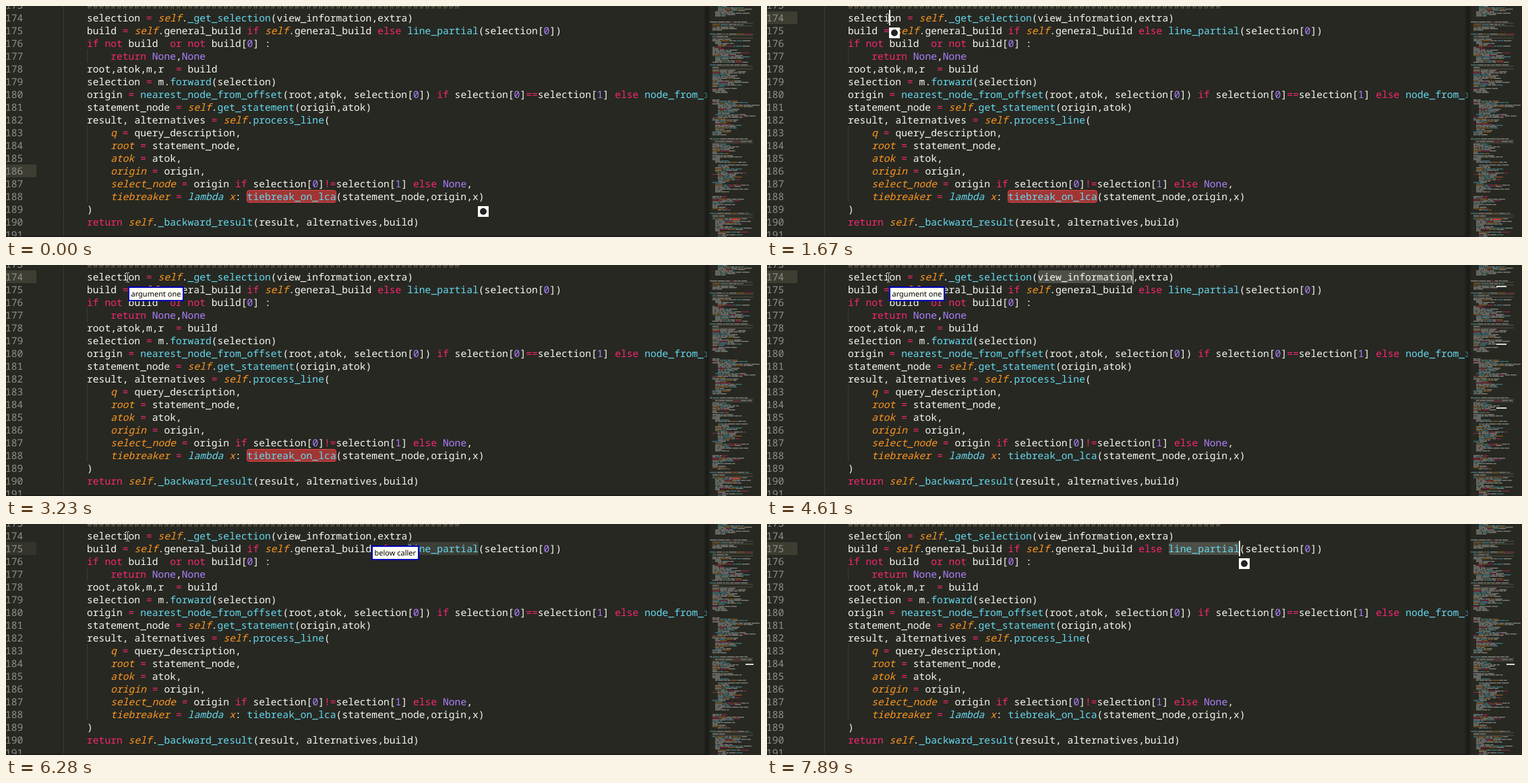
An HTML page with a canvas for the animation above (7.99 s loop, 1120 by 344 pixels).

```html
<!DOCTYPE html>
<html lang="en">
<head>
<meta charset="utf-8">
<title>Voice driven code selection</title>
<style>
html, body { margin: 0; width: 100%; height: 100%; overflow: hidden; background: #272822; }
canvas { display: block; }
</style>
</head>
<body>
<canvas id="stage" width="1120" height="344"></canvas>
<script>
const ctx = document.getElementById('stage').getContext('2d');
const LOOP = 7990, CHAR = 8.8, ROW = 19, LEFT = 120, FIRST = 173;
const MONO = '500 14.667px "Noto Sans Mono", "DejaVu Sans Mono", monospace';
const WHITE = '#f8f8f2', PINK = '#f92672', CYAN = '#66d9ef', PURPLE = '#ae81ff',
      ORANGE = '#fd971f', COMMENT = '#75715e', LIT = '#3e3d32', SELECTED = '#4e4f47';

const code = `${'#'.repeat(63)}
selection = self._get_selection(view_information,extra)
build = self.general_build if self.general_build else line_partial(selection[0])
if not build  or not build[0] :
    return None,None
root,atok,m,r  = build
selection = m.forward(selection)
origin = nearest_node_from_offset(root,atok, selection[0]) if selection[0]==selection[1] else node_from_range(
statement_node = self.get_statement(origin,atok)
result, alternatives = self.process_line(
    q = query_description,
    root = statement_node,
    atok = atok,
    origin = origin,
    select_node = origin if selection[0]!=selection[1] else None,
    tiebreaker = lambda x: tiebreak_on_lca(statement_node,origin,x)
)
return self._backward_result(result, alternatives,build)
`.split('\n');

const rowTop = line => 8 + ROW * (line - 174);
const baseline = line => rowTop(line) + 15;

// Returns [colour, italic] for a token in its line
function styleOf(word, before, after) {
  if (word[0] === '#') return [COMMENT];
  if (/^(if|else|not|or|return|[!=]=?)$/.test(word)) return [PINK];
  if (word === 'self' || /lambda $/.test(before)) return [ORANGE, true];
  if (word === 'lambda') return [CYAN, true];
  if (/^(None|\d+)$/.test(word)) return [PURPLE];
  if (/^\w/.test(word) && after[0] === '(') return [CYAN];
  if (/^ {4}$/.test(before) && after.startsWith(' = ')) return [ORANGE, true];
  return [WHITE];
}

const tokens = code.flatMap((text, i) =>
  [...text.matchAll(/\w+|[!=]=?|#+|[^\w\s!=#]+/g)].map(m => {
    const [color, italic] = styleOf(m[0], text.slice(0, m.index), text.slice(m.index + m[0].length));
    return { word: m[0], x: LEFT + m.index * CHAR, y: baseline(FIRST + i), color, italic };
  }));

// Minimap: blocks of [top, bottom, has a header]
const blocks = [[0, 15, 0], [23, 37, 1], [41, 84, 1], [87, 121, 1], [122, 129, 0], [139, 193, 0],
  [197, 220, 1], [222, 234, 0], [236, 277, 0], [283, 304, 0], [308, 344, 1]];
let seed = 7;
const random = () => (seed = seed * 16807 % 2147483647) / 2147483647;
const minimap = [];
for (const [top, bottom, header] of blocks) {
  let indent = 4;
  for (let y = top; y < bottom; y += 2) {
    const row = (y - top) / 2;
    if (header && (row === 1 || row === 3)) {
      minimap.push([1048, y, 60, COMMENT]);
      continue;
    }
    if (random() < .3) indent = 4 + 4 * Math.floor(random() * 3);
    const first = header && !row;
    let x = 1044 + (first ? 0 : indent);
    const end = x + (first ? 56 : 6 + 46 * random() ** 1.5);
    while (x < end) {
      const w = 3 + random() * 9;
      const pick = random();
      const color = pick < .68 ? WHITE : pick < .84 ? CYAN : pick < .93 ? ORANGE : PINK;
      minimap.push([x, y, w, color]);
      x += w + 1;
    }
  }
}

// Linear interpolation through [time, value, ...] keys
function track(keys, t) {
  const i = keys.findIndex(k => k[0] > t);
  if (i < 0) return keys[keys.length - 1].slice(1);
  if (!i) return keys[0].slice(1);
  const a = keys[i - 1], b = keys[i], p = (t - a[0]) / (b[0] - a[0]);
  return a.slice(1).map((v, j) => v + (b[j + 1] - v) * p);
}
const mousePath = [[30, 484, 129], [200, 243, 14], [430, 243, 14], [610, 201, 10], [840, 201, 10], [930, 180, 10]];
const fades = [[1670, 1910, 0], [2370, 2530, 1], [2900, 2980, 0], [3449, 3450, 1], [3940, 4190, 0],
  [4540, 4690, 1], [5020, 5150, 0], [5630, 5800, 1], [5950, 6110, 0], [6429, 6430, 1],
  [6850, 7010, 0], [7420, 7580, 1]];
const caretAlpha = [[1179, 0], [1180, 1], ...fades.flatMap(([a, b, to]) => [[a, 1 - to], [b, to]])];

function rect(x, y, w, h, color) {
  ctx.fillStyle = color;
  ctx.fillRect(x, y, w, h);
}

function box(x, y, w, h, fill, stroke) {
  ctx.beginPath();
  ctx.roundRect(x, y, w, h, 3);
  ctx.fillStyle = fill;
  ctx.fill();
  if (!stroke) return;
  ctx.strokeStyle = stroke;
  ctx.lineWidth = 1;
  ctx.stroke();
}

function guide(x, top, bottom) {
  for (let y = top; y < bottom; y += 2) rect(x, y, 1, 1, '#50514a');
}

function drawCode() {
  ctx.save();
  ctx.beginPath();
  ctx.rect(0, 0, 1040, 344);
  ctx.clip();
  guide(85, 0, 344);
  guide(120, rowTop(177), rowTop(178));
  guide(120, rowTop(183), rowTop(189));
  for (const { word, x, y, color, italic } of tokens) {
    ctx.font = (italic ? 'italic ' : '') + MONO;
    ctx.fillStyle = color;
    ctx.fillText(word, x, y);
  }
  ctx.font = MONO;
  ctx.fillStyle = '#8f908a';
  for (let n = FIRST; n <= 191; n++) ctx.fillText(n, -1, baseline(n));
  ctx.restore();
}

function drawMinimap(t) {
  const shade = ctx.createLinearGradient(1034, 0, 1046, 0);
  shade.addColorStop(0, 'rgba(20,20,17,0)');
  shade.addColorStop(.5, 'rgba(20,20,17,.7)');
  shade.addColorStop(1, 'rgba(20,20,17,0)');
  rect(1034, 0, 12, 344, shade);
  ctx.globalAlpha = .42;
  for (const [x, y, w, color] of minimap) rect(x, y, w, 1.4, color);
  ctx.globalAlpha = 1;
  if (t < 3450) rect(1075, 317, 14, 2, '#c04040');
  else if (t < 6280) for (const y of [31, 117, 212]) rect(1082, y, 15, 2, '#d8d8d0');
  else rect(1097, 208, 12, 2, '#d8d8d0');
}

function drawMouse(t) {
  const [x, y] = track(mousePath, t).map(Math.round);
  const color = '#c8c8c2';
  rect(x - 2, y + 1, 2, 1, color);
  rect(x + 1, y + 1, 2, 1, color);
  rect(x, y + 2, 1, 13, color);
  rect(x - 2, y + 15, 2, 1, color);
  rect(x + 1, y + 15, 2, 1, color);
}

function drawIcon(x, y) {
  rect(x, y, 16, 16, '#fff');
  ctx.beginPath();
  ctx.arc(x + 8, y + 8, 5, 0, 7);
  ctx.fillStyle = '#222';
  ctx.fill();
}

function drawTooltip(x, y, w, text) {
  rect(x, y, w, 22, '#0000b8');
  rect(x + 2, y + 2, w - 4, 18, '#fffff4');
  ctx.font = '11px "Noto Sans", "Open Sans", sans-serif';
  ctx.fillStyle = '#000';
  ctx.fillText(text, x + 4.5, y + 15);
}

function drawVoice(t) {
  const [x, y] = t < 1670 ? [700, 298] : t < 5080 ? [181, 32] : t < 7800 ? [542, 32] : [700, 51];
  if (t >= 3130 && t < 5150) drawTooltip(x, y, 83, 'argument one');
  else if (t >= 6030 && t < 7890) drawTooltip(x, y, 71, 'below caller');
  else drawIcon(x, y);
}

function drawHighlights(t) {
  // The jump to the next line shows up dimmed first
  ctx.globalAlpha = t >= 6280 && t < 6430 ? .6 : 1;
  rect(0, rowTop(t < 1180 ? 186 : t < 6280 ? 174 : 175), 45, ROW, LIT);
  if (t < 3450) box(357.5, rowTop(188) + .5, 132, 18, '#a03634', '#e04646');
  else if (t < 6280) box(402, rowTop(174), 141, ROW, SELECTED);
  else box(596, rowTop(175), 105, ROW, SELECTED);
  ctx.globalAlpha = 1;
}

function drawCaret(t) {
  const [x, line] = t < 3450 ? [181, 174] : t < 6280 ? [542, 174] : [700, 175];
  ctx.globalAlpha = track(caretAlpha, t)[0];
  rect(x, rowTop(line) - 2, 2, 23, WHITE);
  ctx.globalAlpha = 1;
}

function draw(t) {
  rect(0, 0, 1120, 344, '#272822');
  drawHighlights(t);
  drawCode();
  drawMinimap(t);
  drawCaret(t);
  drawMouse(t);
  drawVoice(t);
  rect(0, 342, 1040, 2, 'rgba(20,20,17,.5)');
}

ctx.textRendering = 'geometricPrecision';
const start = performance.now();
function tick() {
  draw((performance.now() - start) % LOOP);
  requestAnimationFrame(tick);
}
tick();
</script>
</body>
</html>
```
